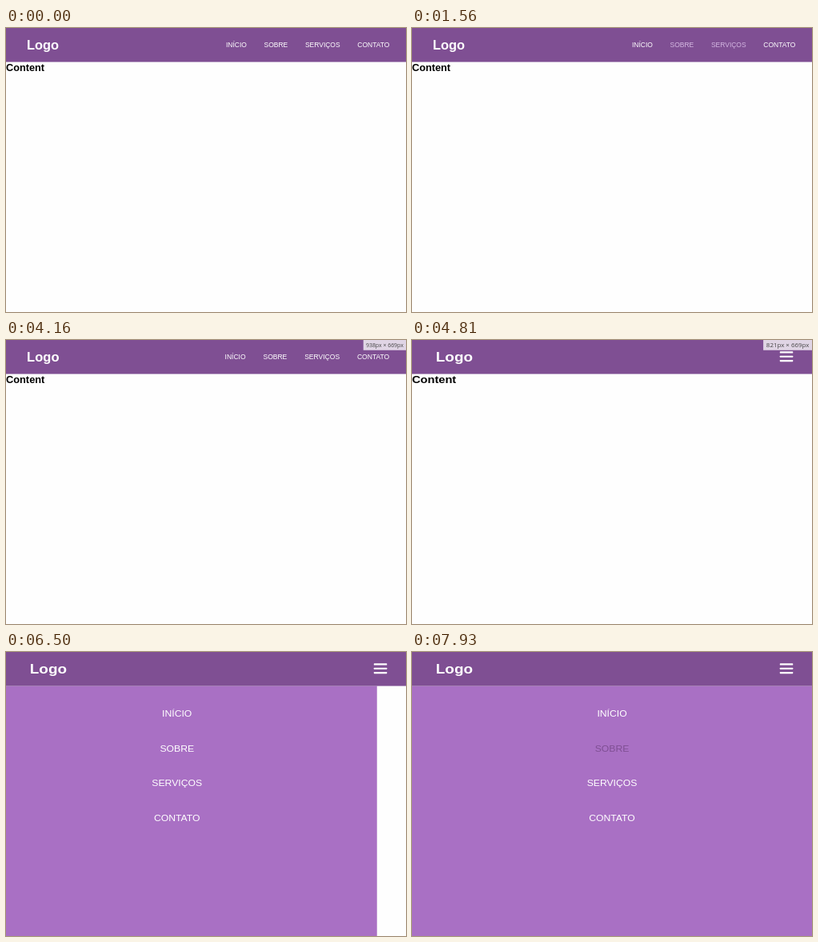
An HTML page that plays this animation: 500 px wide and 356 px high, repeating every 8000 ms.

```html
<!DOCTYPE html>
<html lang="pt">
<head>
<meta charset="utf-8">
<title>Menu responsivo</title>
<style>
  html, body { margin: 0; width: 100%; height: 100%; overflow: hidden; background: #fefefe; }
  #page {
    position: absolute; left: 0; top: 0; height: 669px; overflow: hidden;
    transform-origin: 0 0; background: #fefefe;
    font: 16px "Liberation Sans", Arial, sans-serif;
  }
  header { position: relative; height: 80px; background: #7f4f93; color: #fff; line-height: 80px; z-index: 1; }
  .logo { position: absolute; left: 49px; font-size: 31px; font-weight: bold; }
  nav span { white-space: nowrap; color: #fff; }
  #bar { position: absolute; right: 39px; display: flex; gap: 41px; }
  #burger { position: absolute; right: 39px; top: 26.5px; width: 27px; height: 24px; }
  #burger i { display: block; height: 4px; margin-bottom: 6px; border-radius: 1px; background: currentColor; }
  h2 { margin: 0; font-size: 24px; line-height: 28px; color: #000; }
  #drawer {
    position: absolute; left: 0; top: 80px; width: 100%; height: 589px;
    box-sizing: border-box; padding-top: 24px; background: #a970c4;
    font-size: 20px; line-height: 82px; text-align: center;
  }
  #drawer span { display: block; }
  #size {
    position: absolute; right: 0; top: 0; z-index: 2; height: 24px; padding: 0 6px;
    background: rgba(255, 255, 255, .76); color: #444;
    font: 13px/24px "Open Sans", sans-serif; white-space: nowrap;
  }
</style>
</head>
<body>
<div id="page">
  <header>
    <div class="logo">Logo</div>
    <nav id="bar"></nav>
    <div id="burger"><i></i><i></i><i></i></div>
  </header>
  <h2>Content</h2>
  <nav id="drawer"></nav>
  <div id="size"></div>
</div>
<script>
  const LOOP = 8000, STEP = 130, FADE = 300;
  const STAGE = { w: 500, h: 356 }, VIEW_H = 669, BREAKPOINT = 850;
  const WHITE = [255, 255, 255], DARK = [127, 79, 147], LIGHT = [169, 112, 196];

  // [time, viewport width]
  const widths = [[0, 944], [4160, 938], [4290, 922], [4550, 896], [4680, 848], [4810, 821]];
  // [link index, enter, leave]
  const barHovers = [[0, 700, 1080], [1, 1080, 1470], [2, 1470, 1860], [3, 1860, 2250]];
  const drawerHovers = [[0, 6960, 7500], [1, 7500, 9000]];
  const slide = { start: 6154, length: 515 };
  const sizeShown = [4160, 6240], burgerHover = [5850, 6370];

  const $ = id => document.getElementById(id);
  const page = $('page'), bar = $('bar'), burger = $('burger'), drawer = $('drawer'), size = $('size');

  for (const nav of [bar, drawer])
    for (const label of ['INÍCIO', 'SOBRE', 'SERVIÇOS', 'CONTATO'])
      nav.appendChild(document.createElement('span')).textContent = label;

  const clamp = v => Math.min(1, Math.max(0, v));
  const within = (t, [a, b]) => t >= a && t < b;
  const mix = (a, b, k) => `rgb(${a.map((v, i) => Math.round(v + (b[i] - v) * k))})`;

  // cubic-bezier(.25, .1, .25, 1)
  function ease(x) {
    if (x <= 0 || x >= 1) return clamp(x);
    const curve = (s, a, b) => 3 * (1 - s) ** 2 * s * a + 3 * (1 - s) * s * s * b + s ** 3;
    let lo = 0, hi = 1;
    for (let i = 0; i < 24; i++) {
      const mid = (lo + hi) / 2;
      if (curve(mid, .25, .25) < x) lo = mid; else hi = mid;
    }
    return curve(lo, .1, 1);
  }

  function paintLinks(nav, hovers, color, t) {
    for (const [i, enter, leave] of hovers) {
      const k = ease((t - enter) / FADE) * (1 - ease((t - leave) / FADE));
      nav.children[i].style.color = mix(WHITE, color, k);
    }
  }

  function render(t) {
    const w = widths.filter(([at]) => at <= t).pop()[1];
    const narrow = w <= BREAKPOINT;
    page.style.width = w + 'px';
    page.style.transform = `scale(${STAGE.w / w}, ${STAGE.h / VIEW_H})`;

    bar.style.display = narrow ? 'none' : 'flex';
    burger.style.display = narrow ? 'block' : 'none';
    burger.style.color = mix(WHITE, LIGHT, within(t, burgerHover) ? 1 : 0);

    const open = ease((t - slide.start) / slide.length);
    drawer.style.display = open > 0 ? 'block' : 'none';
    drawer.style.transform = `translateX(${(open - 1) * 100}%)`;

    size.style.display = within(t, sizeShown) ? 'block' : 'none';
    size.textContent = `${w}px × ${VIEW_H}px`;

    paintLinks(bar, barHovers, LIGHT, t);
    paintLinks(drawer, drawerHovers, DARK, t);
  }

  const origin = performance.now();
  function frame() {
    const t = (performance.now() - origin) % LOOP;
    render(Math.floor(t / STEP) * STEP);
    requestAnimationFrame(frame);
  }
  frame();
</script>
</body>
</html>
```
